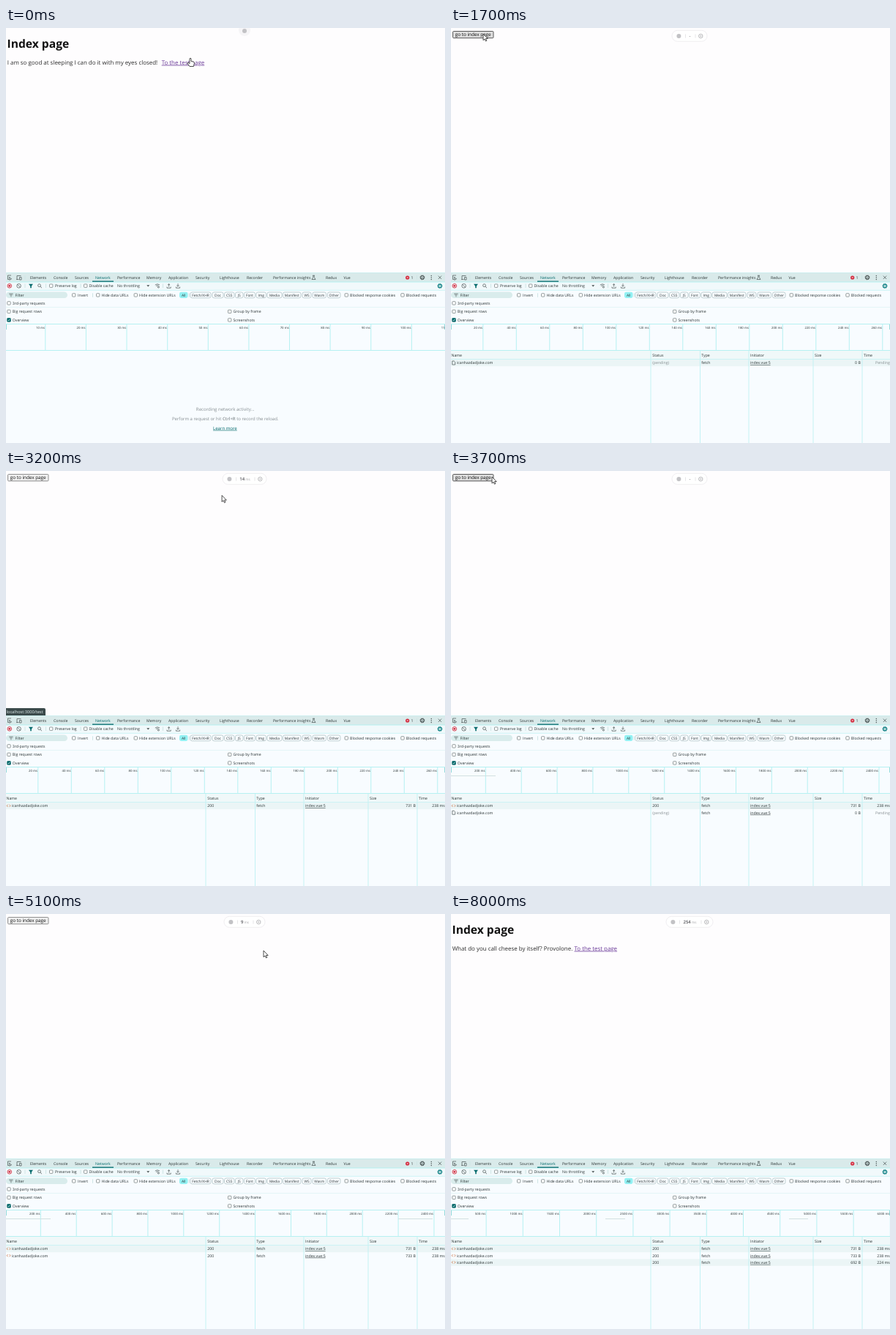
Recreate the animation shown at these times as an HTML page. Size 600 by 567 pixels, loop 8.1 s.

```html
<!DOCTYPE html>
<html lang="en">
<head>
<meta charset="utf-8">
<title>Network panel</title>
<style>
html, body { margin: 0; width: 100%; height: 100%; overflow: hidden; background: #fefdfe; }
svg { display: block; width: 600px; height: 567px; }
text {
  font: 5.2px "Open Sans", "Noto Sans", sans-serif; fill: #2a3333;
  white-space: pre; text-rendering: geometricPrecision;
}
.line { fill: none; stroke: #465050; stroke-width: .7; }
</style>
</head>
<body>
<svg id="stage" viewBox="0 0 600 567" xmlns="http://www.w3.org/2000/svg"></svg>
<script>
const LOOP = 8100;
const TEAL = '#00696b', CYAN = '#b6f1f2', GRAY = '#858d90', INK = '#465050';
const stage = document.getElementById('stage');

// Markup helpers
const rect = (x, y, w, h, fill, more = '') =>
  `<rect x="${x}" y="${y}" width="${w}" height="${h}" fill="${fill}" ${more}/>`;
const text = (x, y, s, more = '') => `<text x="${x}" y="${y}" ${more}>${s}</text>`;
const path = (d, more = '') => `<path class="line" d="${d}" ${more}/>`;
const dot = (x, y, r, more) => `<circle cx="${x}" cy="${y}" r="${r}" ${more}/>`;
const ring = (x, y, r, color = INK, w = .7) =>
  dot(x, y, r, `fill="none" stroke="${color}" stroke-width="${w}"`);
const vline = (x, y1, y2, color = CYAN) => rect(x, y1, 1, y2 - y1, color);
const hline = (y, color = CYAN) => rect(0, y, 600, 1, color);
const style = (size, fill = '#2a3333', more = '') =>
  `style="font-size:${size}px;fill:${fill};${more}"`;
const END = 'text-anchor="end"', MID = 'text-anchor="middle"';
const check = (x, y, label, gap = 7.5) =>
  rect(x + .5, y - 2.3, 4.4, 4.4, '#fff', 'rx=".8" stroke="#6c7676" stroke-width=".7"') +
  text(x + gap, y + 1.9, label);
const divider = (x, y = 349.5) => vline(x, y, y + 5.5, '#cfe5e5');
const gear = (x, y, color) => ring(x, y, 2.3, color, 1.1) + dot(x, y, .7, `fill="${color}"`) +
  dot(x, y, 3.1, `fill="none" stroke="${color}" stroke-width=".7" stroke-dasharray="1.2 1.23"`);

function devtools() {
  const tabs = [[33, 'Elements'], [65, 'Console'], [94, 'Sources'], [122, 'Network'],
    [152, 'Performance'], [192, 'Memory'], [222, 'Application'], [259, 'Security'],
    [292, 'Lighthouse'], [329, 'Recorder'], [365, 'Performance insights'],
    [437, 'Redux'], [461.5, 'Vue']];
  const chips = [[252, 280, 'Fetch/XHR'], [282, 297, 'Doc'], [298.5, 312, 'CSS'], [313.5, 324, 'JS'],
    [325.5, 340.5, 'Font'], [342, 355.5, 'Img'], [357, 377, 'Media'], [378.5, 403, 'Manifest'],
    [405, 417, 'WS'], [419, 437.5, 'Wasm'], [439.5, 457, 'Other']];
  return rect(0, 334, 600, 233, '#f8fcff') +
    rect(0, 334, 600, 13, '#d9eaea') + hline(334, '#cceeee') +
    rect(0, 347, 600, 11, '#f1f9fb') + hline(346.5) + hline(357.8, '#cdf4f5') +
    // tab bar
    path('M7 338H2.5V343.5H4M4.5 340L7.5 343L5.8 343.2L5 344.5Z') +
    path('M15 343V338.5H20.5M14 343.5H17.5M18.5 340.5H21V344H18.5Z') + divider(25.5, 338) +
    tabs.map(([x, s]) => text(x, 342.9, s, s === 'Network' ? style(5.2, TEAL) : '')).join('') +
    rect(118, 345.5, 29, 1.3, TEAL) +
    path('M419 338.2H422M419.8 338.2V340.5L418 343.5H423L421.2 340.5V338.2') +
    dot(548.7, 341, 2.6, 'fill="#d3263a"') +
    path('M547.8 340.1L549.6 341.9M549.6 340.1L547.8 341.9', 'style="stroke:#fff;stroke-width:.6"') +
    text(553.5, 342.9, '1') + divider(561, 338) + gear(569, 340.8, INK) +
    [338.5, 341, 343.5].map(y => dot(581.3, y, .7, `fill="${INK}"`)).join('') +
    path('M590.8 338.6L595.2 343M595.2 338.6L590.8 343') +
    // toolbar
    ring(4.8, 352.3, 2.8, '#d3263a', .9) + dot(4.8, 352.3, 1.4, 'fill="#d3263a"') +
    ring(17.6, 352.3, 2.8) + path('M15.6 350.3L19.6 354.3') + divider(25.5) +
    `<path d="M31 349.8H37L34.8 352.6V355.2H33.2V352.6Z" fill="${TEAL}"/>` +
    ring(45.5, 351.7, 1.9) + path('M46.9 353.1L49 355.2') + divider(54) +
    check(59, 352.3, 'Preserve log', 8) + divider(101.5) + check(106, 352.3, 'Disable cache') +
    text(152, 354.2, 'No throttling') + `<path d="M192.3 351.2H196.2L194.2 353.6Z" fill="${INK}"/>` +
    path('M203.8 351Q207 348.6 210 351M205 352.6Q207 351 208.4 352') + ring(208.4, 353.9, 1.1) +
    divider(214) +
    path('M222.6 353.5V349.8M221 351.2L222.6 349.6L224.2 351.2M220 353.6V355.2H225.2V353.6') +
    path('M235 349.3V353M233.4 351.6L235 353.2L236.6 351.6M232.4 353.6V355.2H237.6V353.6') +
    gear(593, 352.4, '#00797c') +
    // filters
    rect(0, 360.4, 84, 8.6, '#d9ecec', 'rx="4.3"') +
    path('M4.2 363.2H9.6M5.3 365H8.5M6.3 366.8H7.5') + text(12.5, 366.8, 'Filter') +
    check(90, 365, 'Invert', 8) + divider(118, 362.3) +
    check(123, 365, 'Hide data URLs') + check(174.6, 365, 'Hide extension URLs') +
    rect(237, 360.8, 11.5, 8.2, '#93f1f3', 'rx="2.4"') + text(242.7, 366.8, 'All', `${MID} ${style(4.9)}`) +
    divider(249.8, 362.3) +
    chips.map(([a, b, s]) => rect(a, 361, b - a, 7.8, 'none', 'rx="2.4" stroke="#9db2b4" stroke-width=".6"') +
      text((a + b) / 2, 366.7, s, `${MID} ${style(4.9)}`)).join('') +
    check(462.6, 365, 'Blocked response cookies') + check(539.3, 365, 'Blocked requests') +
    check(1.3, 376, '3rd-party requests') + hline(381, '#e4f5f7') +
    check(1.3, 387.5, 'Big request rows') + check(303, 387.5, 'Group by frame') +
    check(1.3, 399, 'Overview') + rect(1.4, 396.3, 5.2, 5.2, TEAL, 'rx=".8"') +
    path('M2.6 399L3.6 400.1L5.4 397.7', 'style="stroke:#fff"') +
    check(303, 399, 'Screenshots');
}

// Timeline rulers: first line, spacing, ms per line, bars of finished requests
const rulers = [
  [53.3, 55.62, 10, []],
  [43.3, 45.5, 20, []],
  [46.8, 48.88, 200, [[0, 61], [536, 583]]],
  [60.8, 62.5, 500, [[0, 31], [264, 298]]],
  [47.6, 50.2, 500, [[0, 24], [211, 238], [462, 488]]],
];
function overview(ruler, done) {
  const [first, gap, unit, bars] = rulers[ruler];
  let out = hline(404) + hline(440);
  for (let i = 0, x = first; x < 640; x += gap, i++) {
    out += vline(x.toFixed(1), 405, 440) +
      text(x - .3, 411.2, `${(i + 1) * unit} ms`, `${END} ${style(4.3)}`);
  }
  for (const [a, b] of bars.slice(0, done)) out += rect(a, 416, b - a, 1, '#d3e0e0');
  return out + rect(0, 405, .8, 7, '#7fd3d5') + rect(599.2, 405, .8, 7, '#7fd3d5');
}

const idle = text(299.7, 523, 'Recording network activity…', `${MID} ${style(6.1, GRAY)}`) +
  text(299.7, 535.6, 'Perform a request or hit <tspan font-weight="600">Ctrl+R</tspan> to record the reload.', `${MID} ${style(6, GRAY)}`) +
  text(299.4, 548.6, 'Learn more', `${MID} ${style(6.05, TEAL, 'text-decoration:underline')}`);

const sizes = [['731 B', '238 ms'], ['733 B', '238 ms'], ['692 B', '224 ms']];
function table(done, pending) {
  const heads = [[.5, 'Name'], [275.3, 'Status'], [342.3, 'Type'], [409, 'Initiator'], [497, 'Size'], [564, 'Time']];
  const gray = style(5.2, GRAY);
  let out = rect(0, 441, 600, 11.5, '#f0f8f9');
  for (let i = 0; i < done + pending; i++) {
    const y = 459.4 + i * 9.25, wait = i >= done;
    if (i % 2 === 0) out += rect(0, y - 6.4, 600, 9.2, '#ebf5f6');
    out += wait ? path(`M1.8 ${y - 4.4}H4.2L5.6 ${y - 3}V${y + .6}H1.8Z`)
      : path(`M2.6 ${y - 3.6}L1.2 ${y - 2}L2.6 ${y - .4}M4.6 ${y - 3.6}L6 ${y - 2}L4.6 ${y - .4}`, 'style="stroke:#c9622f"');
    out += text(8, y, 'icanhazdadjoke.com') +
      text(275.3, y, wait ? '(pending)' : '200', wait ? gray : '') + text(342.3, y, 'fetch') +
      text(409, y, 'index.vue:5', 'text-decoration="underline"') +
      text(559.8, y, wait ? '0 B' : sizes[i][0], END) +
      text(599.8, y, wait ? 'Pending' : sizes[i][1], `${END} ${wait ? gray : ''}`);
  }
  return out + hline(452, '#ccf2f4') +
    [272.5, 340, 406.5, 494.5, 561.5].map(x => vline(x, 441, 567, '#c3f2f4')).join('') +
    heads.map(([x, s]) => text(x, 448.9, s)).join('');
}

function pill(label) {
  if (!label) return dot(326, 3, 8, 'fill="#f6f5f7"') + dot(326, 4, 3, 'fill="#c2c2c5"');
  const w = label === '-' ? 24 : 26 + 2 * label.length;
  const body = label === '-' ? label
    : `<tspan font-weight="600">${label}</tspan><tspan ${style(4.6, '#a0a0a4')}> ms</tspan>`;
  return rect(326 - w, 3.3, 2 * w, 15, '#fff', 'rx="7.5" stroke="#f0eef1" stroke-width="1"') +
    dot(335.4 - w, 11, 3, 'fill="#c2c2c5"') +
    vline(344 - w, 8.5, 13.5, '#e6e6e8') + vline(309.5 + w, 8.5, 13.5, '#e6e6e8') +
    text(326.5, 13, body, `${MID} ${style(6, '#55555a')}`) +
    ring(317.3 + w, 11, 2.7, '#88888c', .6) + dot(317.3 + w, 11, .7, 'fill="#88888c"');
}

const jokes = [
  ['I am so good at sleeping I can do it with my eyes closed!', 212.7],
  ['My boss told me that he was going to fire the person with the worst posture. I have a hunch, it might be me.', 401.5],
  ['Why did the scarecrow win the biggest prize? He was always outstanding in his field.', 313.5],
  ['What do you call cheese by itself? Provolone.', 168.5],
];
function page(joke, look) {
  if (joke < 0) {
    const fill = ['#efefef', '#e5e5e5', '#dedede'][look], edge = look > 1 ? '#333' : '#767676';
    return rect(2.5, 4.5, 55.5, 9.2, fill, `rx="1.2" stroke="${edge}" stroke-width=".8"`) +
      text(30.2, 11.4, 'go to index page', `${MID} ${style(6.35, '#111')}`);
  }
  const [line, x] = jokes[joke];
  return text(1.6, 26.6, 'Index page', style(15.6, '#111', 'font-weight:700')) +
    text(1.7, 49.6, line, style(7.95, '#2c2c2c')) +
    text(x, 49.6, 'To the test page', style(7.9, '#6a3a98', 'text-decoration:underline'));
}

// time, joke (-1: test page), button look, pill label, finished rows, pending rows, ruler
const scenes = [
  [0, 0, 0, '', 0, 0, 0],
  [700, -1, 0, '-', 0, 0, 0],
  [800, -1, 0, '26', 0, 0, 0],
  [1200, -1, 1, '26', 0, 0, 0],
  [1500, -1, 2, '-', 0, 1, 1],
  [1800, 1, 0, '270', 1, 0, 1],
  [3000, -1, 0, '-', 1, 0, 1],
  [3100, -1, 0, '14', 1, 0, 1],
  [3500, -1, 1, '14', 1, 0, 1],
  [3700, -1, 2, '-', 1, 1, 2],
  [3900, 2, 0, '251', 2, 0, 2],
  [4800, -1, 0, '9', 2, 0, 2],
  [5500, -1, 1, '9', 2, 0, 2],
  [5800, -1, 2, '9', 2, 0, 2],
  [6300, -1, 2, '-', 2, 1, 3],
  [6600, 3, 0, '254', 3, 0, 4],
];
// time, x, y, shape until the next key
const moves = [
  [0, 252, 41, 'hand'], [500, 246, 43, 'hand'], [700, 246, 43, 'arrow'], [1000, 48, 14, 'arrow'],
  [1200, 44, 8, 'arrow'], [1700, 44, 8, 'arrow'], [2000, 330, 56, 'arrow'], [2200, 330, 56, 'arrow'],
  [2600, 424, 47, 'hand'], [2700, 425, 47, 'hand'], [3000, 425, 47, 'arrow'], [3500, 56, 8, 'arrow'],
  [3900, 56, 8, 'arrow'], [4500, 345, 47, 'hand'], [4700, 352, 50, 'hand'], [4800, 352, 50, 'arrow'],
  [5100, 352, 50, 'arrow'], [5500, 45, 10, 'arrow'], [6400, 45, 10, 'arrow'], [6700, 315, 33, 'arrow'],
  [7600, 315, 33, 'none'],
];
const bubbles = [[0, 0], [200, .5], [300, 1], [1100, .5], [1200, 0], [2700, .55], [2900, 1], [3300, .5], [3400, 0]];
const shapes = {
  arrow: 'M0 0V8.8L2 7L3.4 10L4.8 9.4L3.5 6.5H6.2Z',
  hand: 'M-1 .8Q0 -.6 1 .8V4.4L4.4 5.2Q5.5 5.6 5.3 7.4L4.4 11.5H-1L-3.9 7.6Q-4.3 6 -3 6.3L-1 7.6Z',
  none: '',
};
const indexAt = (keys, t) => keys.findLastIndex(k => k[0] <= t);

function pointer(t) {
  const i = indexAt(moves, t), a = moves[i], b = moves[i + 1] || a;
  const p = b === a ? 0 : (t - a[0]) / (b[0] - a[0]), e = p * p * (3 - 2 * p);
  return [a[1] + (b[1] - a[1]) * e, a[2] + (b[2] - a[2]) * e, a[3]];
}

stage.innerHTML = rect(0, 0, 600, 567, '#fefdfe') + '<g id="page"></g>' +
  `<g id="bubble">${rect(-3, 324, 57, 13, '#3b4a4b', 'rx="2"')}${text(.6, 331.4, 'localhost:3000/test', style(5.65, '#e4f0f0'))}</g>` +
  devtools() + '<g id="panel"></g>' +
  '<path id="cursor" fill="#fff" stroke="#222" stroke-width=".8" stroke-linejoin="round"/>';
const [pageEl, bubbleEl, panelEl, cursorEl] =
  ['page', 'bubble', 'panel', 'cursor'].map(id => document.getElementById(id));

let shown = -1;
function draw(now) {
  const t = Math.floor((now % LOOP) / 100) * 100;
  const i = indexAt(scenes, t);
  if (i !== shown) {
    const [, joke, look, label, done, pending, ruler] = scenes[i];
    pageEl.innerHTML = page(joke, look) + pill(label);
    panelEl.innerHTML = overview(ruler, done) + (done + pending ? table(done, pending) : idle);
    shown = i;
  }
  bubbleEl.setAttribute('opacity', bubbles[indexAt(bubbles, t)][1]);
  const [x, y, shape] = pointer(t);
  cursorEl.setAttribute('d', shapes[shape]);
  cursorEl.setAttribute('transform', `translate(${x.toFixed(1)} ${y.toFixed(1)})`);
}

const start = performance.now();
function tick() {
  draw(performance.now() - start);
  requestAnimationFrame(tick);
}
tick();
</script>
</body>
</html>
```
